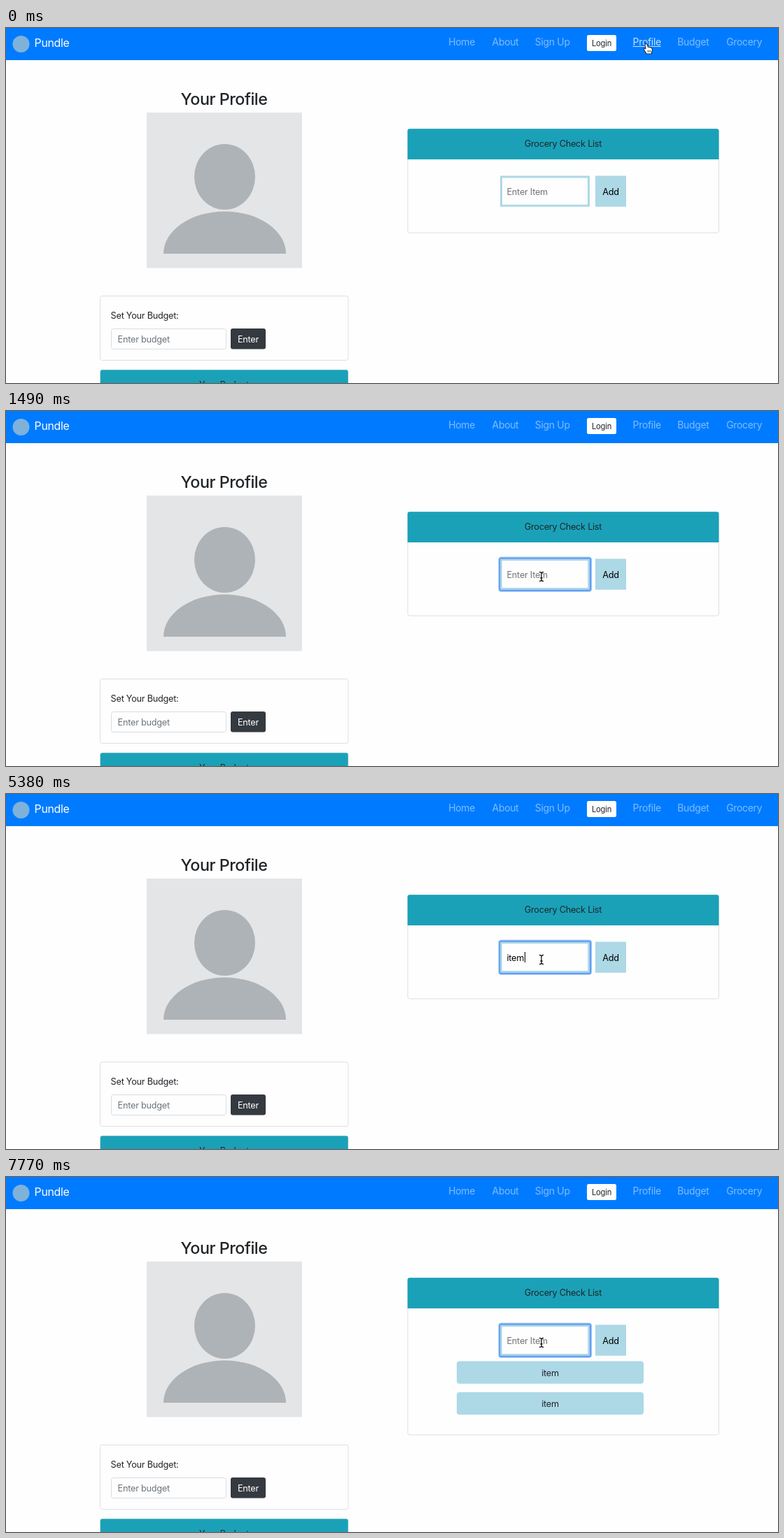
Animation, 1103 px wide and 508 px high, one loop 8 s. Source, as an HTML page with a canvas:

```html
<!DOCTYPE html>
<html lang="en">
<head>
<meta charset="utf-8">
<title>Grocery check list</title>
<style>
  html, body { margin: 0; width: 100%; height: 100%; overflow: hidden; background: #fefefe; }
  canvas { display: block; }
</style>
</head>
<body>
<canvas id="stage" width="1103" height="508"></canvas>
<script>
const ctx = document.getElementById('stage').getContext('2d');
const LOOP = 8000;
const PAGE = '#fefefe', INK = '#212529', TEAL = '#1aa1b8', PALE = '#add8e6', BORDER = '#dfdfdf';
const BODY = 12.7;

// Input timeline: start time, typed text, caret visible, items in the list
const typing = [
  [0, '', false, 0],
  [1040, '', true, 0], [1490, '', false, 0], [2090, '', true, 0],
  [2540, '', false, 0], [2980, '', true, 0], [3580, '', false, 0], [4030, '', true, 0],
  [4180, 'i', true, 0], [4480, '', true, 0], [4630, 'i', true, 0], [4930, '', true, 0],
  [5080, 'i', true, 0], [5230, 'ite', true, 0], [5380, 'item', true, 0],
  [5680, '', true, 1], [6130, '', false, 1],
  [6580, 'i', true, 1], [6880, 'ite', true, 1], [7020, 'item', true, 1],
  [7320, '', true, 2], [7770, '', false, 2]
];

// Pointer timeline: start time, x, y, shape
const pointer = [
  [0, 917, 30, hand], [150, 908, 50, arrow], [300, 872, 106, arrow],
  [440, 824, 176, arrow], [590, 783, 229, beam], [740, 769, 244, beam], [890, 765, 237, beam]
];

const links = [['Home', 632.2], ['About', 694.6], ['Sign Up', 755.8],
  ['Profile', 895.6], ['Budget', 959.3], ['Grocery', 1029.2]];

const at = (steps, t) => steps.filter(s => s[0] <= t).pop();

function box(x, y, w, h, r, fill, stroke, line = 1) {
  ctx.beginPath();
  ctx.roundRect(x, y, w, h, r);
  if (fill) { ctx.fillStyle = fill; ctx.fill(); }
  if (stroke) { ctx.strokeStyle = stroke; ctx.lineWidth = line; ctx.stroke(); }
}

function text(str, x, y, size, color, align = 'left', weight = 400) {
  ctx.font = `${weight} ${size}px Inter, "Noto Sans", sans-serif`;
  ctx.letterSpacing = `${-0.02 * size}px`;
  ctx.textAlign = align;
  ctx.fillStyle = color;
  ctx.fillText(str, x, y);
  return ctx.measureText(str).width;
}

function ellipse(x, y, rx, ry, start, end) {
  ctx.beginPath();
  ctx.ellipse(x, y, rx, ry, 0, start, end);
  ctx.fill();
}

function outlined(path, fill, stroke, line) {
  ctx.lineJoin = 'round';
  ctx.lineWidth = line;
  ctx.strokeStyle = stroke;
  ctx.fillStyle = fill;
  ctx.stroke(path);
  ctx.fill(path);
}

function hand() {
  outlined(new Path2D('M-3.6-6.2Q-2.4-8-1.2-6.2L0-2 1.6-2.6 3-1.6 4.4-1.8 5.6-.4Q6.6 2 5 4.2V6.4H-1.6L-5.2.8Q-4.8-1-2.6.6Z'),
    '#fff', '#111', 1.8);
  ctx.lineWidth = 0.7;
  ctx.stroke(new Path2D('M0 1.8V4.6M1.8 1.8V4.6M3.6 1.8V4.6'));
}

function arrow() {
  outlined(new Path2D('M-4-7V5L-1.2 2.4.8 7 2.8 6.1.9 1.7H4.7Z'), '#111', '#fff', 1.6);
}

function beam() {
  const path = new Path2D('M-3-6.5Q0-6.5 0-4.5Q0-6.5 3-6.5M0-4.5V4.5M-3 6.5Q0 6.5 0 4.5Q0 6.5 3 6.5M-1.6 2H1.6');
  ctx.strokeStyle = 'rgba(255,255,255,.8)';
  ctx.lineWidth = 2.6;
  ctx.stroke(path);
  ctx.strokeStyle = '#111';
  ctx.lineWidth = 1.3;
  ctx.stroke(path);
}

function navbar(overProfile) {
  ctx.fillStyle = '#007bff';
  ctx.fillRect(0, 0, 1103, 46);
  ctx.fillStyle = '#7fb2d9';
  ellipse(21.5, 23, 12, 12, 0, 2 * Math.PI);
  text('Pundle', 40.6, 27.2, 15.9, '#fff');
  for (const [label, x] of links) {
    const lit = overProfile && label === 'Profile';
    const color = lit ? 'rgba(255,255,255,.78)' : 'rgba(255,255,255,.5)';
    const width = text(label, x, 24.6, 13.9, color);
    if (lit) ctx.fillRect(x, 26, width, 1);
  }
  box(830, 10, 42, 23, 2.5, '#fefefe');
  text('Login', 851, 25.6, 11.2, INK, 'center');
}

function profile() {
  text('Your Profile', 311.5, 109.5, 23.3, INK, 'center', 500);
  ctx.fillStyle = '#e4e5e6';
  ctx.fillRect(201, 121, 222, 222.5);
  ctx.fillStyle = '#aeb3b7';
  ellipse(312.5, 213, 43.5, 47, 0, 2 * Math.PI);
  ellipse(312.5, 323, 87.5, 60.5, Math.PI, 2 * Math.PI);

  box(134.5, 383.5, 354.5, 92, 3, PAGE, BORDER);
  text('Set Your Budget:', 149.6, 416, BODY, INK);
  box(150.5, 430.5, 164, 29, 3, PAGE, '#d9dde1');
  text('Enter budget', 159.6, 450, BODY, '#6c757d');
  box(321, 430, 50, 29.5, 3, '#343a40');
  text('Enter', 346, 450, BODY, '#fff', 'center');

  box(134.5, 489, 354.5, 60, 3, TEAL, BORDER, 0.6);
  text('Your Budget', 311.5, 515, BODY, INK, 'center');
}

function checklist(typed, caret, items, focused) {
  const bottom = [293, 325, 369][items];
  box(574, 144.5, 444.5, bottom - 144.5, 3, PAGE, BORDER);
  box(573.7, 144.2, 444.8, 43.8, [3, 3, 0, 0], TEAL);
  text('Grocery Check List', 796, 170, BODY, INK, 'center');

  if (focused) {
    box(705.5, 210.7, 129.5, 46.1, 2, null, 'rgba(90,155,245,.45)', 4.4);
    box(705.5, 210.7, 129.5, 46.1, 2, null, '#639ff3', 2.6);
  }
  box(707.5, 213, 125, 41.3, 0, PAGE, PALE, focused ? 2.4 : 3);
  ctx.fillStyle = PALE;
  ctx.fillRect(842, 211.5, 44, 44.2);
  text('Add', 864, 238.6, BODY, '#000', 'center');

  if (!typed) text('Enter Item', 715.5, 238.6, BODY, '#757575');
  const width = typed ? text(typed, 715.5, 238.6, BODY, '#000') : 0;
  if (caret) {
    ctx.fillStyle = '#000';
    ctx.fillRect(Math.round(716 + width), 226, 1, 15);
  }

  for (let i = 0; i < items; i++) {
    const y = 263.6 + 44.3 * i;
    box(644, y, 267, 32.2, 4, PALE);
    text('item', 777.5, y + 21, BODY, INK, 'center');
  }
}

function draw(t) {
  const [, typed, caret, items] = at(typing, t);
  const [, x, y, shape] = at(pointer, t);
  ctx.fillStyle = PAGE;
  ctx.fillRect(0, 0, 1103, 508);
  navbar(shape === hand);
  profile();
  checklist(typed, caret, items, t >= 1040);
  ctx.save();
  ctx.translate(x, y);
  shape();
  ctx.restore();
}

const start = performance.now();
function tick() {
  draw((performance.now() - start) % LOOP);
  requestAnimationFrame(tick);
}
tick();
</script>
</body>
</html>
```
